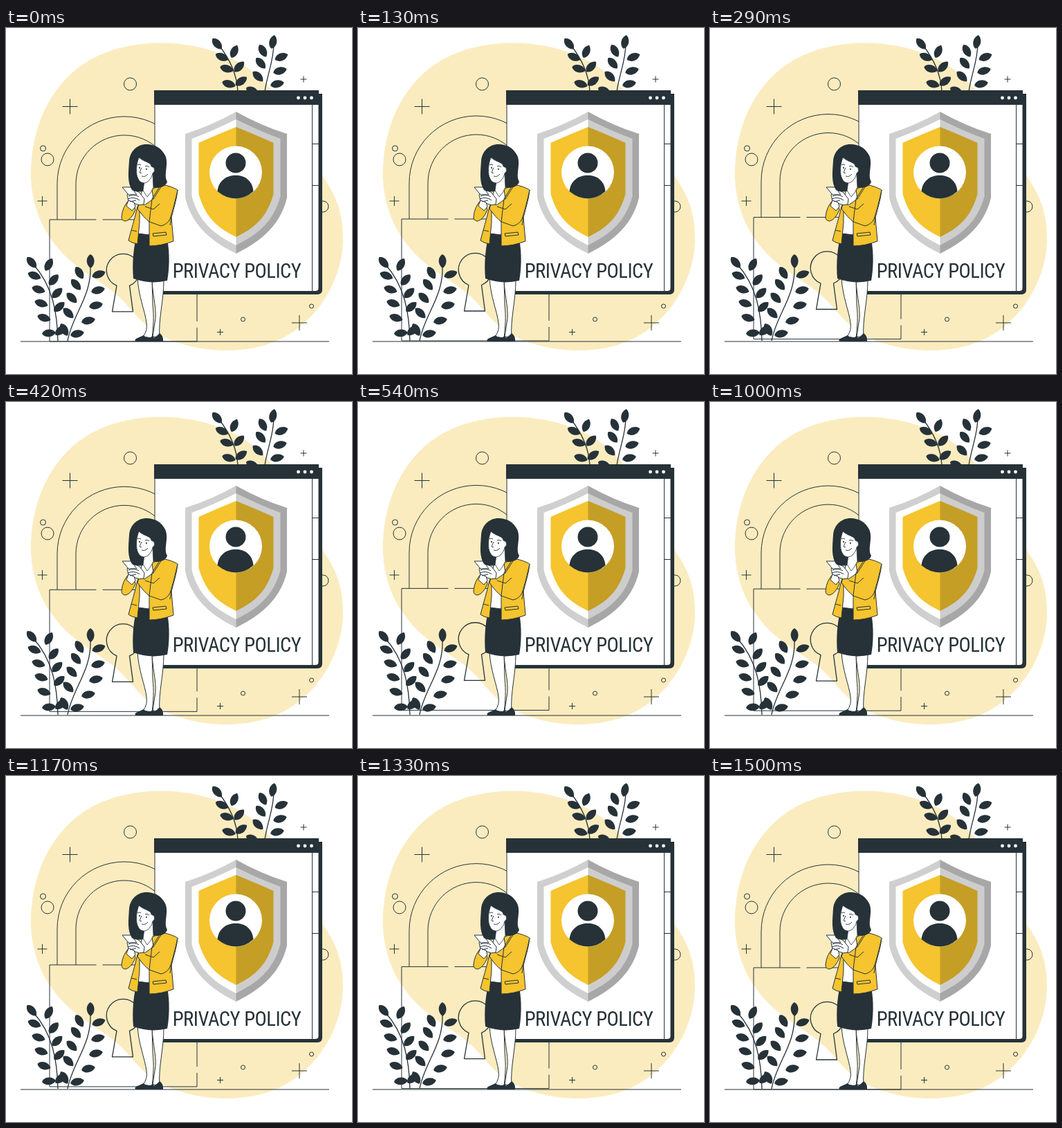
These frames come from a looping animation (500 by 500 pixels, 1540 ms). An HTML page with a canvas:

```html
<!DOCTYPE html>
<html lang="en">
<head>
<meta charset="utf-8">
<title>Privacy policy</title>
<style>
  html, body { margin: 0; width: 100%; height: 100%; overflow: hidden; background: #fff; }
  canvas { display: block; width: 500px; height: 500px; }
</style>
</head>
<body>
<canvas id="stage" width="500" height="500"></canvas>
<script>
const ctx = document.getElementById('stage').getContext('2d');
const INK = '#263238', GOLD = '#f5c42e', CREAM = '#fbecbf', WHITE = '#fff';
const LOOP = 1540, STEPS = 38;

function shape(d, fill, stroke, width = 1) {
  const path = new Path2D(d);
  if (fill) { ctx.fillStyle = fill; ctx.fill(path); }
  if (stroke) { ctx.strokeStyle = stroke; ctx.lineWidth = width; ctx.stroke(path); }
}
const line = (d, width) => shape(d, null, INK, width);

function circle(x, y, r, fill, stroke) {
  ctx.beginPath();
  ctx.arc(x, y, r, 0, Math.PI * 2);
  if (fill) { ctx.fillStyle = fill; ctx.fill(); }
  if (stroke) { ctx.strokeStyle = stroke; ctx.lineWidth = 1; ctx.stroke(); }
}

const plus = (x, y, r) => line(`M${x - r} ${y}h${2 * r}M${x} ${y - r}v${2 * r}`);

function leaf(x, y, degrees) {
  ctx.save();
  ctx.translate(x, y);
  ctx.rotate(degrees * Math.PI / 180);
  shape('M-10 -1C-7 -7 5 -8 10 1C5 7 -6 7 -10 -1Z', INK);
  ctx.restore();
}

function plant(stem, leaves) {
  line(stem, 1.3);
  leaves.forEach(l => leaf(...l));
}

function backdrop() {
  shape('M36 205C38 137 68 75 125 44C178 16 254 14 314 39C354 55 375 77 393 102' +
    'C416 135 424 171 451 206C477 238 488 268 487 310C484 368 449 423 398 449' +
    'C340 477 263 468 216 440C188 422 178 397 148 376C119 355 88 339 66 306' +
    'C46 279 35 243 36 205Z', CREAM);
  for (const [x, y, r] of [[179.5, 81, 9], [53.5, 174, 4], [60, 190, 9],
    [458, 258, 8], [342.5, 421, 3], [441.5, 402, 3]]) circle(x, y, r, null, INK);
  for (const p of [[92.5, 113.5, 11], [52.5, 250, 7], [430, 74, 4.5],
    [424, 426, 11], [309.5, 439.5, 4.5]]) plus(...p);
  plant('M335 92C334 70 326 48 307 24', [[305, 23, 42], [330, 34, -72], [312, 42, 18],
    [337, 56, -52], [319, 59, 10], [340, 77, -42], [322, 81, 10]]);
  plant('M374 92C377 68 387 48 387 22', [[386, 20, -84], [371, 33, 55], [398, 42, -28],
    [368, 51, 42], [396, 62, -22], [364, 70, 38], [392, 81, -18], [356, 91, 20]]);
}

function padlock(lift) {
  ctx.save();
  ctx.translate(0, -lift);
  line('M74 277V225A97 97 0 0 1 268 225V277');
  line('M101 277V225A70 70 0 0 1 241 225V277');
  line('M130.5 277H63V453H276V433M276 424V277H139.5');
  line('M160 372.5A24 24 0 1 1 178.500 372.5L183.500 410H153.500Z', 1.3);
  ctx.restore();
}

function browser() {
  shape('M219 95H457V378Q457 385 450 385H219Z', INK);
  shape('M215 100H451.500V376Q451.500 380 447 380H215Z', WHITE);
  line('M215 100V380M442.500 111V380M442.500 167.500H452M442.500 227.500H452');
  shape('M214 90H452V111H214Z', INK);
  for (const x of [422.5, 432, 441.5]) circle(x, 101, 2.4, WHITE);
}

function shieldPath(top, left, shoulder, hip, bottom) {
  const c = 332.5, right = 2 * c - left, mid = top + (shoulder - top) * 0.62;
  const low = hip + (bottom - hip) * 0.55;
  return `M${c} ${top}Q${c - 35} ${mid} ${left} ${shoulder}V${hip}` +
    `C${left + 10} ${low} ${c - 28} ${bottom - 14} ${c} ${bottom}` +
    `C${c + 28} ${bottom - 14} ${right - 10} ${low} ${right} ${hip}` +
    `V${shoulder}Q${c + 35} ${mid} ${c} ${top}Z`;
}

function shield() {
  const outer = shieldPath(121, 259, 153, 245, 326);
  shape(outer, '#cfcfcf');
  shape(shieldPath(132, 268.5, 160, 243, 314), WHITE);
  shape(shieldPath(143, 278.5, 166, 240, 302), GOLD);
  ctx.save();
  ctx.clip(new Path2D(outer));
  ctx.fillStyle = 'rgba(0,0,0,.195)';
  ctx.fillRect(332.5, 115, 80, 215);
  ctx.restore();

  circle(332, 208.5, 38, WHITE);
  circle(332, 195, 14.5, INK);
  shape('M305.500 236C307 221 318 213 332 213S356 221 357.500 236Q346 246.500 332 246.500T305.500 236Z', INK);
}

function caption() {
  const text = 'PRIVACY POLICY';
  const setFont = size => {
    ctx.font = `${size}px "Roboto Condensed", Roboto, "Open Sans", sans-serif`;
    ctx.fontStretch = 'condensed';
    ctx.letterSpacing = '-0.5px';
  };
  setFont(35);
  setFont(Math.min(35, 35 * 187 / ctx.measureText(text).width));
  ctx.fillStyle = INK;
  ctx.textAlign = 'center';
  ctx.textBaseline = 'alphabetic';
  const box = ctx.measureText('P');
  ctx.fillText(text, 333.5, 350.5 + box.actualBoundingBoxAscent / 2);
}

function foreground() {
  line('M21 453H467', 1.2);
  plant('M75 452C74 412 68 373 39 341', [[37, 339, 42], [62, 342, -68], [41, 358, 15],
    [69, 364, -55], [47, 378, 12], [74, 383, -50], [51, 398, 12],
    [77, 403, -48], [55, 419, 12], [84, 436, 55], [62, 441, -12]]);
  plant('M89 452C96 414 124 388 122 344', [[122, 337, 82], [134, 356, -26], [106, 354, 52],
    [133, 379, -20], [101, 371, 42], [130, 401, -18], [95, 390, 38],
    [119, 423, -18], [90, 412, 38], [103, 442, -18], [79, 437, -48]]);
}

function legs() {
  shape('M211 364C212 389 219 410 215 426L212 446L222 447C220 420 228 395 228 364Z', WHITE, INK);
  shape('M190 360C191 387 201 409 203 426Q205 437 198 446L211 448' +
    'C213 431 214 418 212 400L211 364Z', WHITE, INK);
  shape('M209 453C210 449 217 447 222 441Q228 445 227 453Z', INK);
  shape('M187 453Q185 450 190 448L199 444Q204 450 213 445L215 453Z', INK);
}

function outfit() {
  shape('M190 294L233 306C237 325 236 349 233 365Q208 371 184 362C182 340 184 317 190 294Z', INK);
  shape('M197 233L190 260L191 297L207 299L214 246L211 229Z', WHITE, INK);
  shape('M190 258C186 276 181 291 177 307Q182 311 190 312L193 281L193 255Z', GOLD, INK);
  shape('M178 248Q168 259 167 273Q167 279 173 279Q181 277 187 263L184 252Z', GOLD, INK);
  shape('M211 233L225 226Q240 229 248 234C247 247 242 261 239 274L242 308' +
    'Q224 315 207 315L207 281L201 261L213 248Z', GOLD, INK);
  shape('M225 228L213 247L200 256L193 251L190 261Q199 274 207 280L224 286' +
    'Q233 284 237 276C241 264 245 248 248 234', GOLD, INK);
  line('M222 254L213 262L201 258M224 226L211 247L207 280M239 273L237 285' +
    'M212 297L231 295L232 299L213 301ZM181 292L189 294');
}

function hands() {
  shape('M175 241L181 234Q189 234 193 238L200 247L199 255Q192 257 187 254L177 250Z', WHITE, INK);
  shape('M177 249L185 252L187 258L182 264L174 257Z', WHITE, INK);
  shape('M168 230L181 230L189 241L177 241Z', WHITE, INK);
  line('M177 243Q185 239 192 244M176 247Q185 243 193 249M179 251L188 249');
}

function head() {
  shape('M205 168C190 167 179 178 178 192C177 208 175 223 182 234' +
    'C190 239 204 236 211 230C222 233 231 229 233 222C227 212 236 197 230 184' +
    'C224 173 216 169 205 168Z', INK);
  shape('M200 221L198 235L204 244Q210 238 213 230L212 211Z', WHITE, INK, .8);
  shape('M192 187C188 197 187 211 191 218C194 225 202 226 207 220' +
    'Q211 216 212 210Q216 207 214 202L210 200C210 194 200 194 192 187Z', WHITE, INK, .8);
  line('M190 198Q192 196 195 198M201 200Q204 198 207 201M196 202L193 209L196 210' +
    'M196 214Q201 216 205 211', .9);
  circle(193, 202, 1.1, INK);
  circle(203, 204, 1.1, INK);
}

function draw(now) {
  const step = Math.floor((now % LOOP + 1) / LOOP * STEPS);
  const time = step * LOOP / STEPS;
  const lift = 4.5 * (1 - Math.cos(2 * Math.PI * (time + 45) / LOOP));

  ctx.fillStyle = WHITE;
  ctx.fillRect(0, 0, 500, 500);
  backdrop();
  padlock(lift);
  browser();
  shield();
  caption();
  foreground();
  legs();
  outfit();
  hands();
  head();
}

ctx.lineJoin = 'round';
let start;
function tick(now) {
  start ??= now;
  draw(now - start);
  requestAnimationFrame(tick);
}
requestAnimationFrame(tick);
</script>
</body>
</html>
```
